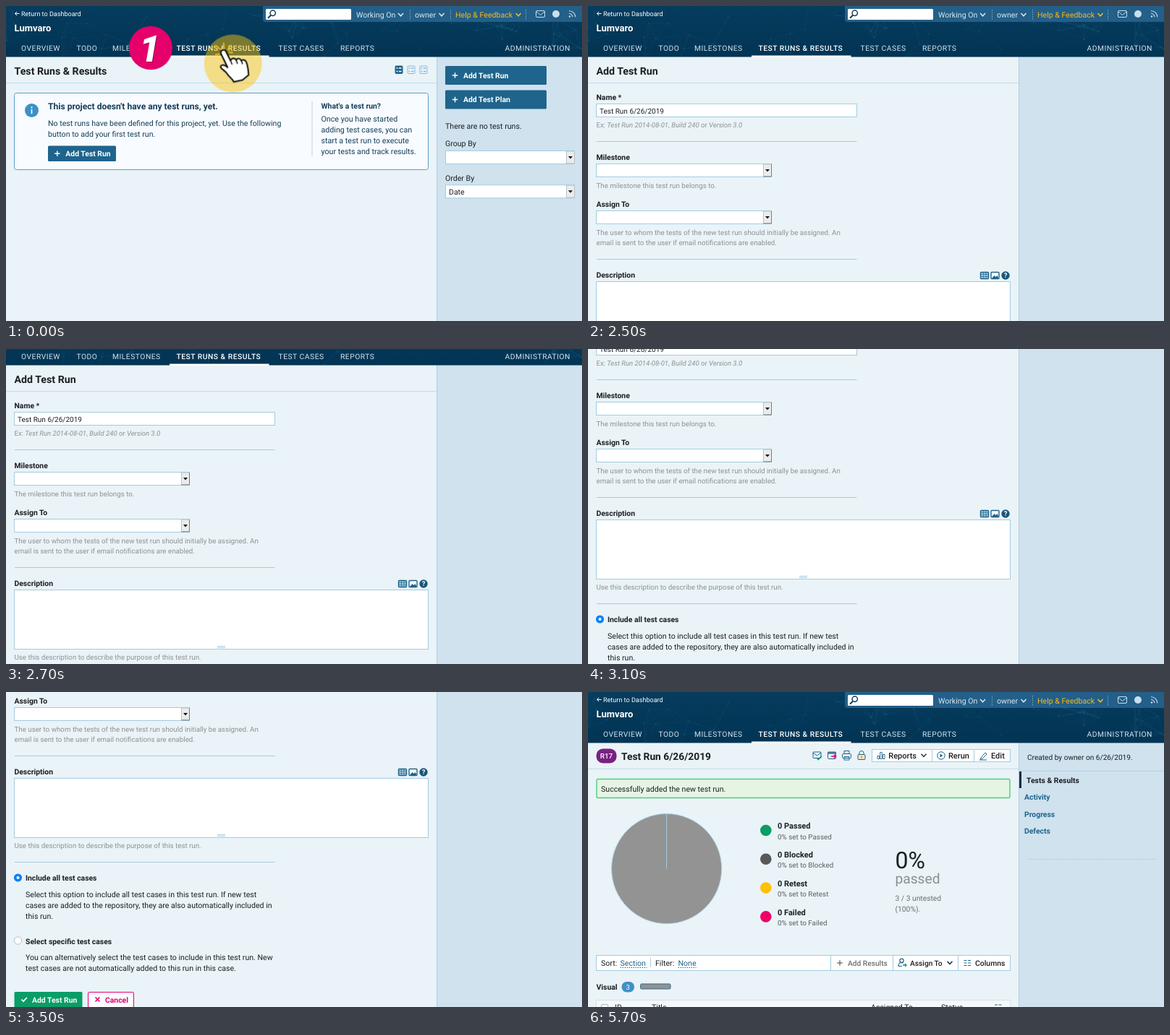
An HTML page that plays this animation: 796 px wide and 436 px high, repeating every 8 s.

```html
<!DOCTYPE html>
<html lang="en">
<head>
<meta charset="utf-8">
<title>Adding a test run</title>
<style>
html, body { margin: 0; width: 100%; height: 100%; overflow: hidden; background: #eaf3f7; }
svg { display: block; width: 796px; height: 436px; }
text { font: 10.6px Roboto, sans-serif; fill: #1b1f23; text-rendering: geometricPrecision; white-space: pre; }
text.bold { font-size: 10.4px; font-weight: 600; }
text.medium { font-size: 10.6px; font-weight: 500; }
text.title { font-size: 14.2px; font-weight: 600; }
text.hint { font-size: 9.75px; fill: #8d9296; }
text.ex { font-size: 9.5px; fill: #8d9296; }
.ex tspan { font-style: italic; }
text.field { font-size: 10px; }
text.sub { font-size: 9.85px; fill: #5c6064; }
text.nav { font-size: 10.3px; letter-spacing: .5px; fill: #d3e4ee; }
text.active { font-weight: 500; fill: #fff; }
text.white { fill: #fff; }
text.link { fill: #1f648c; }
text.navy { fill: #153e58; }
text.pale { fill: #d8e8f2; }
text.gold { fill: #fbb917; }
text.gray { fill: #6b6f73; }

#scroll, #list, #form, #result, #badge, #pointer { animation: 8s step-end infinite; }
#scroll { animation-name: scroll; }
#list { animation-name: list; }
#form { animation-name: form; }
#result { animation-name: result; }
#badge { animation-name: badge; }
#pointer { animation-name: pointer; }
@keyframes scroll {
  0%, 31.25% { transform: translateY(0); }
  33.75% { transform: translateY(-48px); }
  36.25% { transform: translateY(-97px); }
  38.75% { transform: translateY(-145px); }
  41.25% { transform: translateY(-203px); }
  43.75% { transform: translateY(-262px); }
  46.25% { transform: translateY(-320px); }
  71.25%, 100% { transform: translateY(0); }
}
@keyframes list { 0% { opacity: 1; } 31.25%, 100% { opacity: 0; } }
@keyframes form { 0% { opacity: 0; } 31.25% { opacity: 1; } 71.25%, 100% { opacity: 0; } }
@keyframes result { 0% { opacity: 0; } 71.25%, 100% { opacity: 1; } }
@keyframes badge { 0% { opacity: 1; } 6.25%, 100% { opacity: 0; } }
@keyframes pointer {
  0% { transform: translate(313.7px, 79.5px); opacity: 1; }
  6.25% { transform: translate(121.7px, 225px); opacity: 1; }
  31.25% { transform: translate(95.5px, 385.5px); opacity: 0; }
  46.25% { transform: translate(95.5px, 385.5px); opacity: 1; }
  71.25%, 100% { transform: translate(95.5px, 385.5px); opacity: 0; }
}
</style>
</head>
<body>
<svg id="stage" viewBox="0 0 796 436"></svg>
<script>
const BLUE = '#1f648c', SKY = '#3d91c6', LINE = '#a3cbe3', PINK = '#e5006d', GREEN = '#0a9d67';

const text = (x, y, s, cls = '', style = '') => `<text x="${x}" y="${y}" class="${cls}" style="${style}">${s}</text>`;
const rect = (x, y, w, h, fill, stroke = 'none', r = 0, extra = '') =>
  `<rect x="${x}" y="${y}" width="${w}" height="${h}" rx="${r}" fill="${fill}" stroke="${stroke}" ${extra}/>`;
const circle = (x, y, r, fill, stroke = 'none', extra = '') =>
  `<circle cx="${x}" cy="${y}" r="${r}" fill="${fill}" stroke="${stroke}" ${extra}/>`;
const stroke = (d, color, width = 1, extra = '') =>
  `<path d="${d}" fill="none" stroke="${color}" stroke-width="${width}" ${extra}/>`;
const group = (id, ...parts) => `<g id="${id}">${parts.flat().join('')}</g>`;
const hr = y => stroke(`M12 ${y}H371.5`, LINE);
const chevron = (x, y, color) => stroke(`M${x - 3.5} ${y - 2}l3.5 3.8l3.5 -3.8`, color, 1.5);
const plus = (x, y, color) => stroke(`M${x - 3.7} ${y}h7.4M${x} ${y - 3.7}v7.4`, color, 1.4);

const button = (x, y, w, h, label, gap) =>
  rect(x, y, w, h, BLUE, 'none', 1.5) + plus(x + gap - 11.5, y + h / 2, '#fff') +
  text(x + gap, y + h / 2 + 3.8, label, 'bold white');

const select = (x, y, w, edge, value = '') =>
  rect(x + .5, y, w - 1, 18, '#fff', LINE) +
  rect(x + w - 11.5, y + .5, 11, 17, '#ececec', '#b9c3ca') +
  stroke(`M${x + w - .5} ${y + .5}v17h-11`, edge) +
  `<path d="M${x + w - 9} ${y + 7.5}h6l-3 3.5z" fill="#111"/>` + text(x + 5, y + 13.2, value, 'field', 'font-size:10.5px');

// Faint constellation behind the navigation
function network() {
  let seed = 11;
  const random = () => (seed = seed * 16807 % 2147483647) / 2147483647;
  const points = Array.from({ length: 75 }, () => [random() * 796, random() * 84 - 8]);
  let d = '';
  points.forEach(([x, y], i) => points.slice(i + 1).forEach(([u, v]) => {
    if (Math.hypot(u - x, v - y) < 46) d += `M${x.toFixed(1)} ${y.toFixed(1)}L${u.toFixed(1)} ${v.toFixed(1)}`;
  }));
  return stroke(d, '#5aa5cc', .5, 'opacity=".1"') +
    points.map(([x, y]) => circle(x.toFixed(1), y.toFixed(1), .7, '#7fbfe0', 'none', 'opacity=".18"')).join('');
}

const tabs = [[21, 'OVERVIEW'], [97.5, 'TODO'], [147, 'MILESTONES'], [376.5, 'TEST CASES'], [462, 'REPORTS'], [689.5, 'ADMINISTRATION']];

const header = [
  `<g clip-path="url(#bar)">${rect(0, 0, 796, 71, 'url(#navy)')}${network()}</g>`,
  stroke('M18.5 10.5h-6m2.6 -2.6l-2.6 2.6l2.6 2.6', '#fff', 1),
  text(21, 13.7, 'Return to Dashboard', 'white', 'font-size:9.05px'),
  text(11.5, 34.7, 'Lumvaro', 'title white', 'font-size:13px'),
  `<path d="M355 0H796V22H359Q355 22 355 18Z" fill="#235f88"/>`,
  rect(359, 4, 118, 15, '#fff', 'none', 1.5),
  circle(368.7, 9.8, 3.7, 'none', '#123f5c', 'stroke-width="1.5"'),
  stroke('M366 12.7l-4 4', '#123f5c', 2),
  text(484, 16, 'Working On', 'pale'), chevron(545.5, 12, '#d8e8f2'),
  text(565, 16, 'owner', 'pale'), chevron(602, 12, '#d8e8f2'),
  text(621, 16, 'Help &amp; Feedback', 'gold'), chevron(708, 12, '#fbb917'),
  stroke('M558.5 5v14M614.5 5v14M718.5 5v14', '#7fabc6', 1, 'stroke-dasharray="1.5 1.5"'),
  rect(732.5, 6.5, 12, 9, 'none', '#c9dfec', 1.5), stroke('M733 8l5.5 4.5l5.5 -4.5', '#c9dfec'),
  circle(760, 11, 5, '#c9dfec'),
  circle(779, 14.5, 1.2, '#c9dfec'), stroke('M778 10.3a5 5 0 0 1 5 5M778 6.8a8.5 8.5 0 0 1 8.8 8.5', '#c9dfec', 1.1),
  tabs.map(([x, label]) => text(x, 62, label, 'nav')).join(''),
  text(235.5, 62, 'TEST RUNS &amp; RESULTS', 'nav active'),
  rect(226, 68.5, 137.5, 2.5, '#fff'),
  stroke('M0 106.5H595', '#c3dbea')
];

const viewIcon = (x, color, fill) => rect(x - 5, 83, 10, 10.5, fill, color, 1) +
  stroke(`M${x - 3.5} 86h2M${x - 3.5} 90.5h2M${x} 86h3.5M${x} 90.5h3.5`, fill === 'none' ? color : '#fff', 1.3);

const list = [
  text(11.5, 94.5, 'Test Runs &amp; Results', 'title'),
  viewIcon(543, BLUE, BLUE), viewIcon(560, '#84bbdc', 'none'), viewIcon(577, '#84bbdc', 'none'),
  rect(11.5, 120.5, 572, 106, '#f8fbff', '#5a9fca', 3),
  circle(35.5, 144.5, 9.5, SKY), circle(35.5, 140.3, 1.1, '#fff'), stroke('M35.5 142.8v6.4', '#fff', 1.6),
  text(58, 142.7, "This project doesn't have any test runs, yet.", 'bold navy', 'font-size:12.1px'),
  text(58, 166, 'No test runs have been defined for this project, yet. Use the following', 'navy'),
  text(58, 181, 'button to add your first test run.', 'navy'),
  button(58, 193.5, 94, 21.5, 'Add Test Run', 24.3),
  stroke('M423 132V208', '#bdd3e2'),
  text(435.5, 142, "What's a test run?", 'bold navy'),
  ['Once you have started', 'adding test cases, you can', 'start a test run to execute', 'your tests and track results.']
    .map((s, i) => text(435.5, 159.5 + i * 15.1, s, 'navy', 'font-size:10.7px')).join(''),
  button(607, 83, 140, 26, 'Add Test Run', 25), button(607, 116.5, 140, 26, 'Add Test Plan', 25),
  text(607, 170, 'There are no test runs.'),
  text(607, 194.4, 'Group By'), select(607, 200.5, 179, '#b9c3ca'),
  text(607, 242, 'Order By'), select(607, 247.8, 179, '#b9c3ca', 'Date')
];

const form = [
  text(11.5, 94.5, 'Add Test Run', 'title'),
  text(11.5, 130, 'Name *', 'bold'), rect(11.5, 135.5, 360, 18, '#fff', LINE),
  text(16, 148.5, 'Test Run 6/26/2019', 'field'),
  text(11.5, 167.5, 'Ex: <tspan>Test Run 2014-08-01</tspan>, <tspan>Build 240</tspan> or <tspan>Version 3.0</tspan>', 'ex'),
  hr(187.5),
  text(11.5, 213.3, 'Milestone', 'bold'), select(11, 218.5, 243, '#6f7f8a'),
  text(11.5, 251.5, 'The milestone this test run belongs to.', 'hint'),
  text(11.5, 278.3, 'Assign To', 'bold'), select(11, 283.5, 243, '#6f7f8a'),
  text(11.5, 316.5, 'The user to whom the tests of the new test run should initially be assigned. An', 'hint'),
  text(11.5, 330.5, 'email is sent to the user if email notifications are enabled.', 'hint'),
  hr(350.5),
  text(11.5, 376.3, 'Description', 'bold'),
  rect(542.5, 368.5, 11, 9, '#9fc6dd', BLUE, 1, 'stroke-width="1.4"'), stroke('M543 371.5h10M543 374.5h10M546.5 369v8M550 369v8', BLUE, .6),
  rect(557, 368.5, 11, 9, '#fff', BLUE, 1, 'stroke-width="1.4"'), `<path d="M558 377l3.5 -4l2 2l2 -2l2 4z" fill="${BLUE}"/>`,
  circle(577, 373, 5.7, '#17567c'), text(577, 376.4, '?', 'bold white', 'font-size:9.5px;text-anchor:middle'),
  rect(11.5, 381.5, 572, 82, '#fff', LINE), stroke('M292 459.5h11M292 461.5h11', LINE),
  text(11.5, 477.8, 'Use this description to describe the purpose of this test run.', 'hint'),
  hr(497.5),
  circle(16.5, 519, 5.6, '#0a82f5'), circle(16.5, 519, 2, '#fff'),
  text(27, 523.3, 'Include all test cases', 'bold'),
  text(27, 546.3, 'Select this option to include all test cases in this test run. If new test'),
  text(27, 561.3, 'cases are added to the repository, they are also automatically included in'),
  text(27, 576.3, 'this run.'),
  circle(16.5, 606, 5.2, '#fff', '#b4bbc0'),
  text(27, 610.5, 'Select specific test cases', 'bold'),
  text(27, 633.3, 'You can alternatively select the test cases to include in this test run. New'),
  text(27, 648.3, 'test cases are not automatically added to this run in this case.'),
  rect(11.5, 677, 94, 21.5, GREEN, 'none', 1.5), stroke('M21.5 687.5l2.5 2.7l4.8 -5.2', '#fff', 1.7),
  text(36, 691.5, 'Add Test Run', 'bold white'),
  rect(113.5, 677.5, 63, 21, '#fbfdff', PINK, 1.5), stroke('M123.5 684.5l6 6m0 -6l-6 6', PINK, 1.7),
  text(137, 691.5, 'Cancel', 'bold', `fill:${PINK}`)
];

const legend = [['Passed', GREEN], ['Blocked', '#595959'], ['Retest', '#ffc107'], ['Failed', '#ec0068']];
const columnsIcon = (x, y) => stroke([0, 3.5, 7].map(dy => `M${x} ${y + dy}h4M${x + 5.5} ${y + dy}h4`).join(''), BLUE, 1.2);

const result = [
  rect(11.5, 78.5, 28, 20, '#7a2182', 'none', 9), text(25.5, 92, 'R17', 'medium white', 'font-size:9.8px;text-anchor:middle'),
  text(46, 94, 'Test Run 6/26/2019', 'title', 'font-size:13.8px'),
  rect(311, 83, 11, 8.5, 'none', BLUE, 1), stroke('M311 84l5.5 4l5.5 -4', BLUE), stroke('M316 91l2.3 2.5l4.5 -5', GREEN, 1.6),
  rect(331.5, 83, 11, 9.5, 'none', BLUE, 1), stroke('M331.5 84.5h11', BLUE, 2), stroke('M336 89h6.5m-2.5 -2.5l2.5 2.5l-2.5 2.5', PINK, 1.6),
  rect(351.5, 85.5, 12, 6, 'none', BLUE, 1), stroke('M354 85.5v-4h7v4M354 89.5h7v4.5h-7z', BLUE),
  rect(373, 86.5, 10, 7, '#f3e3c3', BLUE, 1), stroke('M375 86.5v-2a3 3 0 0 1 6 0v2', BLUE), stroke('M378 88.5v3', '#e89a1c', 1.6),
  rect(392.5, 79.5, 191, 17, '#fff', LINE), stroke('M475.5 79.5v17M533.5 79.5v17', LINE),
  stroke('M400 92.5v-4h2.5v4zM403.7 92.5v-9h2.5v9zM407.5 92.5v-6h2.5v6z', BLUE, .9),
  text(415.3, 91.6, 'Reports', 'medium', 'font-size:11px'), chevron(464, 87.7, '#16384c'),
  circle(488, 88, 5.2, '#fff', BLUE), `<path d="M486.5 85.5l4 2.5l-4 2.5z" fill="${BLUE}"/>`,
  text(498, 91.6, 'Rerun', 'medium', 'font-size:11px'),
  stroke('M543 91l6 -7l2 2l-6 6.5l-2.7 .7zM541 94h10', BLUE), text(557, 91.6, 'Edit', 'medium', 'font-size:11px'),
  rect(12, 120.5, 571, 26, '#e5f4e3', '#52c982', 2, 'stroke-width="1.4"'),
  text(18, 137.5, 'Successfully added the new test run.'),
  circle(108.6, 244.6, 76, '#939393', '#a3cde6'), stroke('M108.6 244.6V168.5', '#a3cde6'),
  legend.map(([name, color], i) => {
    const y = i * 39.8;
    return circle(245.8, 191.5 + y, 7.8, color) + text(262, 189.1 + y, `0 ${name}`, 'bold', 'font-size:11px') +
      text(262, 203.6 + y, `0% set to ${name}`, 'sub');
  }).join(''),
  text(424.5, 244, '0%', '', 'font-size:32px'),
  text(424.5, 265, 'passed', '', 'font-size:19.2px;fill:#8b8f92'),
  text(424.5, 289.2, '3 / 3 untested', 'gray', 'font-size:10.3px'), text(424.5, 303.5, '(100%).', 'gray', 'font-size:10.3px'),
  rect(11.5, 364.5, 572, 21, '#fff', LINE), stroke('M335.5 364.5v21M421.5 364.5v21M511.5 364.5v21M86.5 368v13', LINE),
  text(18, 379, 'Sort:'), text(44.5, 379, 'Section', 'link'), text(93, 379, 'Filter:'), text(124.5, 379, 'None', 'link'),
  stroke('M44.5 381.5h37M124.5 381.5h25', BLUE, 1, 'stroke-dasharray="1.5 1.5"'),
  plus(348, 375, '#777'), text(359, 379, 'Add Results', 'medium gray', 'font-size:10.2px'),
  circle(433.5, 371.7, 2.6, 'none', BLUE, 'stroke-width="1.2"'), stroke('M429 379.5q0 -5 4.5 -5l2 .6M429 379.5h5', BLUE, 1.2),
  stroke('M435 378h5m-2 -2l2 2l-2 2', GREEN, 1.3),
  text(445, 379, 'Assign To', 'medium', 'font-size:10.2px'), chevron(500, 374.8, '#16384c'),
  columnsIcon(519.5, 371.5), text(535, 379, 'Columns', 'medium', 'font-size:10.4px'),
  text(11.5, 412, 'Visual', 'bold'),
  rect(46.5, 401, 17.5, 14.5, SKY, 'none', 7), text(55.2, 411.7, '3', 'white', 'font-size:9.5px;text-anchor:middle'),
  rect(72.5, 404, 41.5, 7, '#929292', '#2b6f98', 1.5),
  rect(11.5, 426.5, 572, 14, '#f5f9fc', '#d3e2ec'), rect(18.5, 432.5, 9, 9, '#fff', '#a9b4bb', 1.5),
  text(37, 440, 'ID'), text(88, 440, 'Title'), text(391, 440, 'Assigned To'), text(488, 440, 'Status'), columnsIcon(562, 433),
  text(607, 94, 'Created by owner on 6/26/2019.', '', 'font-size:10.15px'),
  stroke('M596 109.5H796', '#b3d0e2'), rect(596, 110, 3, 23, '#0d3049'),
  text(606, 126, 'Tests &amp; Results', 'bold'),
  ['Activity', 'Progress', 'Defects'].map((s, i) => text(603, 149.2 + i * 23.3, s, 'bold link')).join(''),
  stroke('M607 231.5H786', '#9dbfd3', 1, 'stroke-dasharray="1 1.5"')
];

const pointer = [
  circle(0, 0, 40, '#fdc40c', 'none', 'opacity=".48"'),
  stroke('M-24 -12l5 -1M-23 -24l5 4M-13 -28l.5 6M-3 -25l-4 5M-1 -15l-4 -.5', '#f9b514', 2, 'stroke-linecap="round"'),
  `<path d="M-16.5 -13C-18.5 -18.5 -11.5 -21 -9.5 -16L-3.5 -4C-2 -8 3 -8 4.3 -4.6C6 -8 10.5 -7 11.5 -3.5C13.5 -6 17.5 -5 18.5 -1.5C20.5 4 21 8 21.5 16L13 23L1 25.5C-1.5 20 -5.5 19 -8 14.5C-10 10.5 -15.5 8.5 -17 5.5C-18.3 2 -12 .5 -7.5 5.5Z" fill="#fff" stroke="#111" stroke-width="2" stroke-linejoin="round"/>`,
  stroke('M-3.5 -4l2 5M4.3 -4.6l1.7 4.6M11.5 -3.5l1.5 4', '#111', 1.5, 'stroke-linecap="round"')
];

const digit = (x, y, color) =>
  text(x, y, '1', '', `font-size:51px;font-weight:900;font-style:italic;text-anchor:middle;fill:${color}`);
const badge = [
  circle(200.5, 58.8, 30, '#000', 'none', 'opacity=".2"'),
  circle(200, 58, 30, '#e5006b'),
  digit(199.7, 77.5, '#98004a'), digit(198.5, 76.5, '#fff')
];

document.getElementById('stage').innerHTML = `
  <defs>
    <clipPath id="bar"><rect width="796" height="70.5"/></clipPath>
    <linearGradient id="navy" x2="0" y2="1"><stop stop-color="#063c5e"/><stop offset="1" stop-color="#023454"/></linearGradient>
  </defs>` +
  rect(0, 0, 796, 436, '#eaf3f7') + rect(595, 0, 201, 436, '#cfe2ee') + stroke('M595.5 0V436', '#afcfe3') +
  group('scroll', header, group('list', list), group('form', form), group('result', result)) +
  group('badge', badge) + group('pointer', pointer);
</script>
</body>
</html>
```
